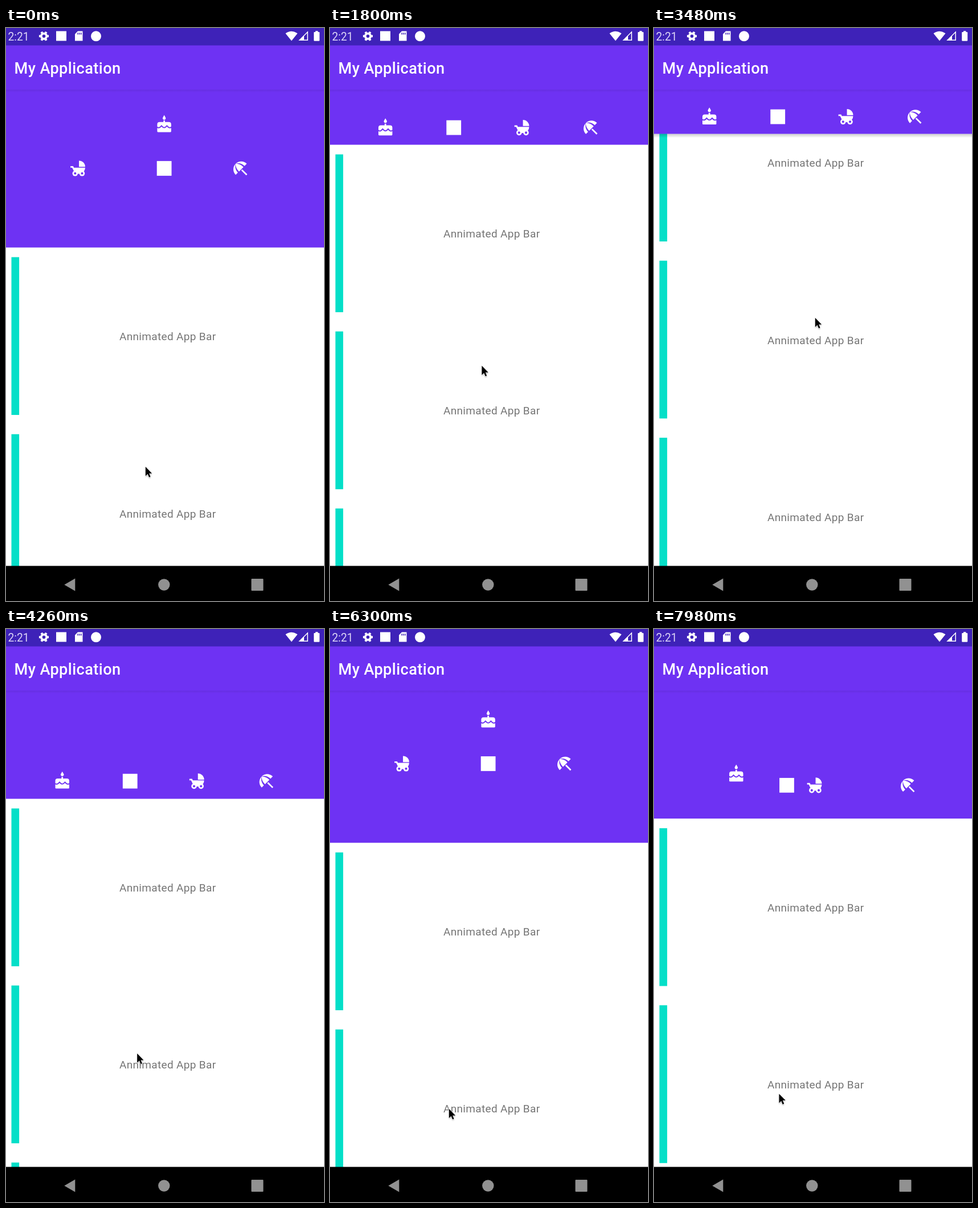
Animation, 558 px wide and 1004 px high, one loop 8 s. Source, as an HTML page:

```html
<!DOCTYPE html>
<html lang="en">
<head>
<meta charset="utf-8">
<title>Animated app bar</title>
<style>
  html, body { margin: 0; width: 100%; height: 100%; overflow: hidden; background: #fff; }
  svg { display: block; position: absolute; left: 0; top: 0; }
  text { font-family: Roboto, "Open Sans", sans-serif; }
  .title { font-size: 27.15px; font-weight: 500; letter-spacing: .016em; fill: #fff; }
  .clock { font-size: 19.3px; fill: #dcd5f7; }
  .label { font-size: 19px; letter-spacing: .0179em; fill: #757575; text-anchor: middle; }
  .bar { fill: #6e32f3; }
  .cut { fill: none; stroke: #6e32f3; stroke-width: 1.45; }
</style>
</head>
<body>
<svg width="558" height="1004" viewBox="0 0 558 1004">
  <defs>
    <linearGradient id="fade" x1="0" y1="0" x2="0" y2="1">
      <stop offset="0" stop-color="#000" stop-opacity=".2"/>
      <stop offset="1" stop-color="#000" stop-opacity="0"/>
    </linearGradient>
    <filter id="soft" x="-50%" y="-50%" width="200%" height="200%">
      <feGaussianBlur stdDeviation="1.3"/>
    </filter>
    <path id="arrow" d="M0 0V17L4 13.3L6.6 19.5L9.3 18.4L6.7 12.3H12Z"/>
  </defs>

  <rect width="558" height="1004" fill="#fff"/>
  <g id="list"></g>

  <g id="header">
    <rect id="shade" width="558" height="7" fill="url(#fade)"/>
    <rect class="bar" y="-400" width="558" height="400"/>
    <g id="icons" fill="#fff">
      <g>
        <path d="M12 0L13.7 3A2 2 0 1 1 10.3 3Z"/>
        <path d="M11 7H13V9H18A3 3 0 0 1 21 12V21A1 1 0 0 1 20 22H4A1 1 0 0 1 3 21V12A3 3 0 0 1 6 9H11Z"/>
        <path class="cut" d="M2.6 15.4A3 3 0 0 0 7 15.3L8.5 13.8L10 15.3A2.8 2.8 0 0 0 14 15.3L15.5 13.8L17 15.3A3 3 0 0 0 21.4 15.4"/>
      </g>
      <rect x="2.5" y="2.5" width="19" height="19"/>
      <g>
        <path d="M13 2V10H21A8 8 0 0 0 13 2Z"/>
        <path d="M2 9H5.5L6.4 11H21A8 8 0 0 1 19.3 15.9L17 19H8L6.3 15.4L4.2 11H2Z"/>
        <circle cx="8" cy="18.5" r="3.5"/>
        <circle cx="17" cy="18.5" r="3.5"/>
        <circle class="bar" cx="8" cy="18.5" r="1.5"/>
        <circle class="bar" cx="17" cy="18.5" r="1.5"/>
      </g>
      <path d="M13.1 14.6l1.4-1.4L21 19.6L19.6 21zm4.3-5.8l2.9-2.9c-4-3.9-10.4-3.9-14.3 0 3.9-1.3 8.3-.2 11.4 2.9zM6 6c-4 3.9-4 10.3 0 14.3l2.8-2.9C5.7 14.300 4.700 9.900 6 6zc-.4 3 1.100 6.900 4.300 10l5.700-5.700c-3.100-3.200-7-4.700-10-4.300z"/>
    </g>
  </g>

  <!-- toolbar -->
  <rect class="bar" width="558" height="108"/>
  <rect y="108" width="558" height="5" fill="url(#fade)" opacity=".35"/>
  <text class="title" x="14.5" y="80">My Application</text>

  <!-- status bar -->
  <rect width="558" height="30.5" fill="#3e22b8"/>
  <text class="clock" x="3.5" y="22">2:21</text>
  <g fill="none" stroke="#fff" transform="translate(66.5 14.3)">
    <circle r="4.7" stroke-width="3.8"/>
    <circle r="7.3" stroke-width="2.6" pathLength="12" stroke-dasharray="1 1" stroke-dashoffset=".5"/>
  </g>
  <g fill="#fff">
    <rect x="88" y="5.5" width="18" height="17"/>
    <path d="M126 5.5H134.500V22.500H121V10.500Z"/>
    <circle cx="158" cy="14.3" r="9"/>
    <path d="M490.5 9.5Q501 2 511.5 9.5L501 22.5Z"/>
    <path d="M514 22L523 13V22Z"/>
    <rect x="543" y="5.2" width="4.4" height="3"/>
    <rect x="540.2" y="7" width="10" height="15.800" rx="1.200"/>
  </g>
  <path d="M126.2 8.2v3.4M129 8.2v3.4M131.8 8.2v3.4" stroke="#3e22b8" stroke-width="1.5"/>
  <path d="M515 21.2L529.2 7V21.2Z" fill="none" stroke="#fff" stroke-width="1.5"/>

  <!-- navigation bar -->
  <rect y="942.5" width="558" height="62"/>
  <g fill="#919191">
    <path d="M102.3 975.5L121.3 964.4V986.6Z"/>
    <circle cx="277.3" cy="975.5" r="10.2"/>
    <rect x="430.5" y="965" width="21" height="21" rx="1"/>
  </g>

  <g id="cursor">
    <use href="#arrow" y="1.8" opacity=".4" filter="url(#soft)"/>
    <use href="#arrow" stroke="#fff" stroke-width="1.4" paint-order="stroke"/>
  </g>
</svg>
<script>
const LOOP = 8000, STEP = 60, MORPH = 350;
const OPEN = 384.6, SHUT = 185.5, HALF = 96;
const PITCH = 310.2, ROWS = 4;

// each drag glides to x, y; rest is the pointer height that puts the list at its top
const drags = [
  { from: 0,    to: 960,  x: 286, y: 466, rest: 755 },
  { from: 1400, to: 2400, x: 228, y: 821, rest: 771 },
  { from: 2540, to: 3480, x: 282, y: 507, rest: 811 },
  { from: 3500, to: 4740, x: 203, y: 861, rest: 830 },
  { from: 6120, to: 7180, x: 268, y: 587, rest: 850 },
  { from: 7430, to: 8170, x: 209, y: 858, rest: 866 }
];
// x and height above the header's lower edge
const spread = [[277.6, 215.7], [277.6, 138.6], [126.7, 138.6], [411.2, 138.6]];
const lined = spread.map((_, i) => [97.2 + 120 * i, 30]);

const $ = id => document.getElementById(id);
const list = $("list"), header = $("header"), shade = $("shade"), cursor = $("cursor");
const icons = [...$("icons").children];
const clamp = (v, lo, hi) => Math.min(hi, Math.max(lo, v));
const mix = (a, b, p) => a + (b - a) * p;
const smooth = u => u * u * (3 - 2 * u);
const move = (el, x, y, more = "") => el.setAttribute("transform", `translate(${x} ${y})${more}`);

// cubic-bezier(.4, 0, .2, 1)
function ease(x) {
  let lo = 0, hi = 1;
  for (let k = 0; k < 20; k++) {
    const u = (lo + hi) / 2, w = 1 - u;
    if (1.2 * w * w * u + .6 * w * u * u + u * u * u < x) lo = u; else hi = u;
  }
  return smooth(lo);
}

function dragAt(d, t) {
  const u = smooth(clamp((t - d.from) / (d.to - d.from), 0, 1));
  const x = mix(d.x0, d.x, u), y = mix(d.y0, d.y, u);
  return { x, y, scroll: clamp(d.rest - y, 0, d.far) };
}

// link the drags and find when each one carries the header past its middle
let last = { x: 244, y: 768 };
for (const d of drags) {
  d.x0 = last.x;
  d.y0 = last.y;
  d.opens = d.y > d.y0;
  d.far = d.opens ? last.rest - last.y : d.rest - d.y;
  d.flip = d.from;
  while (d.flip < d.to && dragAt(d, d.flip).scroll < HALF !== d.opens) d.flip++;
  last = d;
}

for (let k = 0; k < ROWS; k++) {
  const y = k * PITCH;
  list.insertAdjacentHTML("beforeend",
    `<rect x="9.5" y="${401.5 + y}" width="13.6" height="276.5" fill="#05dfc8"/>
     <text class="label" x="283.7" y="${547.3 + y}">Annimated App Bar</text>`);
}

function draw(t) {
  const d = drags.findLast(d => d.from <= t);
  const { x, y, scroll } = dragAt(d, t);
  const edge = Math.max(OPEN - scroll, SHUT);
  const done = ease(clamp((t - d.flip) / MORPH, 0, 1));
  const p = d.opens ? done : 1 - done;

  move(cursor, x + .8, y + .8, " scale(.95)");
  move(list, 0, -scroll);
  move(header, 0, edge);
  shade.setAttribute("opacity", edge > SHUT ? 0 : 1);
  icons.forEach((icon, i) => {
    const [x0, y0] = lined[i], [x1, y1] = spread[i];
    move(icon, mix(x0, x1, p), -mix(y0, y1, p), " scale(1.357) translate(-12 -12)");
  });
}

const begin = performance.now();
function tick() {
  const t = (performance.now() - begin) % LOOP;
  draw(Math.floor(t / STEP) * STEP);
  requestAnimationFrame(tick);
}
tick();
</script>
</body>
</html>
```
